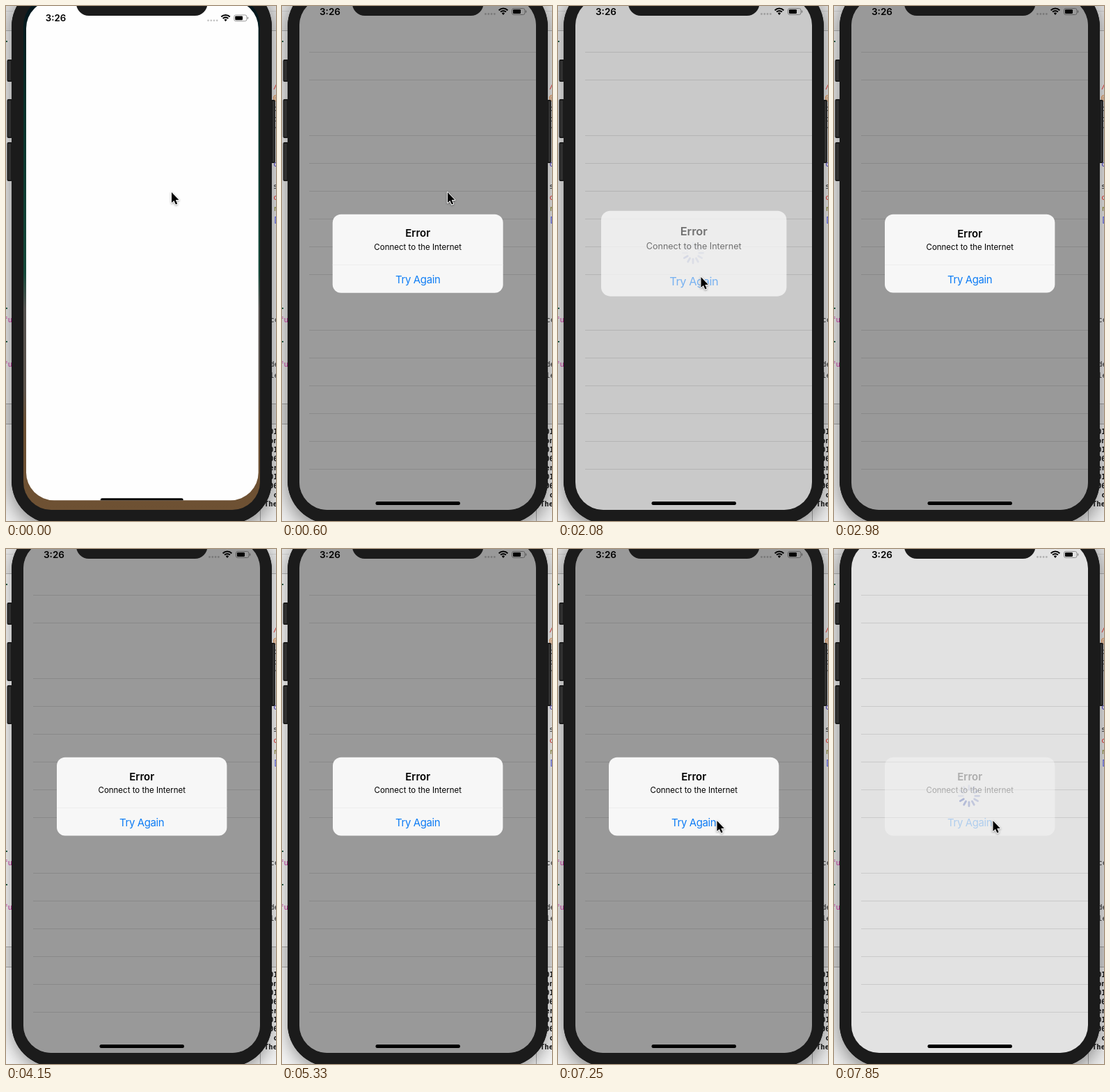
Animation, 388 px wide and 741 px high, one loop 7990 ms. Source, as an HTML page with a canvas:

```html
<!DOCTYPE html>
<html lang="en">
<head>
<meta charset="utf-8">
<title>Alert retry</title>
<style>
html, body { margin: 0; width: 100%; height: 100%; overflow: hidden; background: #eee; }
canvas { display: block; }
</style>
</head>
<body>
<canvas id="stage" width="388" height="741"></canvas>
<script>
const ctx = document.getElementById('stage').getContext('2d');
const LOOP = 7990;
const SANS = 'Inter, "Liberation Sans", sans-serif';
const MONO = '"DejaVu Sans Mono", monospace';

// The screen refreshes only at these moments.
const TICKS = [0, 150, 300, 450, 600, 1040, 1190, 1340, 1490, 1640, 1790, 1930, 2080,
  2230, 2380, 2530, 2980, 4150, 5330, 5480, 5630, 5770, 5920, 6070, 6210, 6360,
  6510, 6660, 6810, 6960, 7110, 7250, 7850];

const ALERT_EVENTS = [
  { at: 200, show: true }, { at: 1550, show: false },
  { at: 1970, show: true }, { at: 6270, show: false },
  { at: 6636, show: true }, { at: 7688, show: false }
];

const clamp = v => Math.min(1, Math.max(0, v));
const mix = (a, b, k) => a + (b - a) * k;
const ease = k => k * k * (3 - 2 * k);

function spring(ms) {
  if (ms > 550) return 1;
  const x = ms * 0.016;
  return 1 - (1 + x) * Math.exp(-x);
}

function alertState(t) {
  const last = ALERT_EVENTS.filter(e => e.at <= t).pop();
  if (!last) return { p: 0, scale: 1 };
  const k = spring(t - last.at);
  return last.show ? { p: k, scale: 1.19 - 0.19 * k } : { p: 1 - k, scale: 1 };
}

function cursorAt(t) {
  if (t < 2980) {
    const k = ease(clamp((t - 950) / 450));
    return [mix(238, 205.5, k), mix(268, 390, k)];
  }
  if (t < 5480) return null;
  const k = ease(clamp((t - 5330) / 740));
  return [mix(378, 228.5, k), mix(20, 391, k)];
}

function box(x, y, w, h, r, fill) {
  ctx.beginPath();
  ctx.roundRect(x, y, w, h, r);
  if (fill) {
    ctx.fillStyle = fill;
    ctx.fill();
  }
}

function rect(x, y, w, h, fill) {
  ctx.fillStyle = fill;
  ctx.fillRect(x, y, w, h);
}

function text(str, x, y, font, fill, align = 'left', spacing = 0) {
  ctx.font = font;
  ctx.fillStyle = fill;
  ctx.textAlign = align;
  ctx.letterSpacing = spacing + 'px';
  ctx.fillText(str, x, y);
}

function drawEditor() {
  rect(0, 0, 388, 741, '#f4f4f4');
  rect(0, 0, 388, 35, '#e6e6e6');
  rect(0, 7, 388, 1, '#d2d2d2');
  rect(0, 35, 388, 1, '#b4b4b4');
  rect(0, 572, 388, 30, '#e4e4e4');
  rect(0, 572, 388, 1, '#aaa');
  rect(0, 601, 388, 1, '#aaa');
  rect(365, 602, 1, 139, '#aaa');
}

function drawCode() {
  const code = '11px ' + MONO;
  for (const y of [51, 435, 483]) rect(0, y - 1, 2, 2, '#16503c');
  for (const y of [455, 519]) text('fu', -4, y, code, '#b0308f');
  const right = [['/', 119, '#c4302b'], ['@', 135, '#c46a20'], ['c', 151, '#222'],
    ['c', 166, '#222'], ['r', 180, '#222'], ['c', 231, '#3a2fa8'], ['s', 263, '#222'],
    ['c', 279, '#c4302b'], ['r', 295, '#77752a'], ['[', 311, '#2b35c9'],
    ['cc', 455, '#222'], ['de', 519, '#222'], ['le', 535, '#222']];
  for (const [s, y, fill] of right) text(s, s.length > 1 ? 379 : 384, y, code, fill);
  ['01', 'on', '01', '06', 'er', '01', '06', ' c', 'The'].forEach((s, i) =>
    text(s, s.length > 2 ? 371 : 378, 616 + i * 13, 'bold 10.5px ' + MONO, '#111'));
}

function drawPhone(active) {
  ctx.save();
  ctx.shadowColor = `rgba(0,0,0,${active ? 0.5 : 0.38})`;
  ctx.shadowBlur = active ? 32 : 24;
  ctx.shadowOffsetY = 8;
  box(8, -32, 374, 777, 62, '#1b1b1b');
  ctx.restore();
  drawCode();
  for (const [y, h] of [[77, 32], [134, 56], [196, 56]]) {
    box(1.5, y, 8, h, 2, '#1a1a1a');
    rect(3, y + 2, 4, h - 4, '#303030');
  }
  box(380, 135, 7, 91, 2, '#1a1a1a');
  rect(383, 137, 3, 87, '#303030');
  box(8, -32, 374, 777, 62, '#1b1b1b');
}

function drawWallpaper() {
  const g = ctx.createLinearGradient(0, 0, 0, 725);
  g.addColorStop(0, '#03161c');
  g.addColorStop(0.2, '#08302a');
  g.addColorStop(0.53, '#15493a');
  g.addColorStop(0.6, '#555250');
  g.addColorStop(0.76, '#5d544c');
  g.addColorStop(0.83, '#6b4f32');
  g.addColorStop(1, '#6e5133');
  rect(25, -12, 340, 737, g);
}

function drawStatus() {
  text('3:26', 54, 13, '600 13.5px ' + SANS, '#000');
  for (let i = 0; i < 4; i++) {
    ctx.beginPath();
    ctx.arc(292.5 + i * 4.3, 11.5, 1.4, 0, 7);
    ctx.fillStyle = '#c4c4c4';
    ctx.fill();
  }
  ctx.strokeStyle = '#000';
  ctx.lineWidth = 2.1;
  for (const r of [5.5, 9]) {
    ctx.beginPath();
    ctx.arc(318, 12.5, r, -Math.PI * 0.75, -Math.PI * 0.25);
    ctx.stroke();
  }
  ctx.beginPath();
  ctx.moveTo(318, 13);
  ctx.arc(318, 12.5, 3, -Math.PI * 0.75, -Math.PI * 0.25);
  ctx.fillStyle = '#000';
  ctx.fill();
  box(330.5, 3.5, 18.5, 9, 2.5);
  ctx.strokeStyle = '#999';
  ctx.lineWidth = 1;
  ctx.stroke();
  box(332, 5, 11, 6, 1.2, '#000');
  box(350, 6.3, 1.3, 3.4, 0.7, '#999');
}

const drawHome = () => box(134.5, 713, 121.5, 5, 2.5, '#000');

function drawTable() {
  rect(25, -12, 340, 737, '#f8f8f8');
  for (let row = 0; row < 16; row++) {
    if (row !== 2 && row !== 9) rect(39, 66 + row * 40, 326, 1, '#dedede');
  }
}

function drawSpinner(t) {
  const head = Math.floor(t * 0.012 - (t < 4000 ? 4 : 1.9));
  ctx.save();
  ctx.translate(194, 355.3);
  for (let i = 0; i < 12; i++) {
    const age = (((head - i) % 12) + 12) % 12;
    ctx.save();
    ctx.rotate(i * Math.PI / 6);
    ctx.globalAlpha = Math.max(0.25, 1 - age * 0.1);
    box(-1.4, -16, 2.8, 8.5, 1.4, '#7c8ccb');
    ctx.restore();
  }
  ctx.restore();
}

function drawAlert({ p, scale }) {
  if (p <= 0) return;
  rect(25, -12, 340, 737, `rgba(0,0,0,${0.383 * clamp((p - 0.05) / 0.95)})`);
  ctx.save();
  ctx.translate(195.2, 356.2);
  ctx.scale(scale, scale);
  ctx.translate(-195.2, -356.2);
  ctx.globalAlpha = 1 - (1 - p) ** 2;
  box(73, 299.8, 244.4, 112.8, 12, '#f7f7f7');
  ctx.globalAlpha = p;
  rect(73, 372, 244.4, 0.8, '#ececec');
  text('Error', 195.2, 332.5, '600 15px ' + SANS, '#000', 'center');
  text('Connect to the Internet', 195.2, 350.6, '11.5px ' + SANS, '#000', 'center');
  text('Try Again', 195.2, 398.5, '15px ' + SANS, '#0f7df5', 'center', -0.4);
  ctx.restore();
}

function drawCursor(pos) {
  if (!pos) return;
  ctx.save();
  ctx.translate(...pos);
  ctx.beginPath();
  for (const [x, y] of [[0, 0], [0, 15], [3.4, 12], [5.9, 17.6], [8.2, 16.6], [5.8, 11], [10.4, 11]]) {
    ctx.lineTo(x, y);
  }
  ctx.closePath();
  ctx.lineJoin = 'round';
  ctx.lineWidth = 1.8;
  ctx.strokeStyle = '#fff';
  ctx.shadowColor = 'rgba(0,0,0,.4)';
  ctx.shadowBlur = 3;
  ctx.shadowOffsetY = 1;
  ctx.stroke();
  ctx.shadowColor = 'transparent';
  ctx.fillStyle = '#000';
  ctx.fill();
  ctx.restore();
}

function drawLaunch() {
  drawWallpaper();
  box(29, -8, 333.7, 719.3, 40, '#fefefe');
  ctx.clip();
  ctx.translate(195 * 0.02, 9.5);
  ctx.scale(0.98, 0.98);
  drawStatus();
  drawHome();
}

function drawApp(t) {
  drawTable();
  drawStatus();
  const alert = alertState(t);
  if (alert.p < 0.99) drawSpinner(t);
  drawAlert(alert);
  drawHome();
}

function draw(t) {
  drawEditor();
  drawPhone(t < 4150 || t >= 6070);
  ctx.save();
  box(25, -12, 340, 737, 40);
  ctx.clip();
  if (t < 150) drawLaunch();
  else drawApp(t);
  ctx.restore();
  box(101, -40, 188.5, 54, 18, '#1b1b1b');
  drawCursor(cursorAt(t));
}

const start = performance.now();
function frame() {
  const t = (performance.now() - start) % LOOP;
  draw(TICKS.filter(tick => tick <= t).pop());
  requestAnimationFrame(frame);
}
frame();
</script>
</body>
</html>
```
